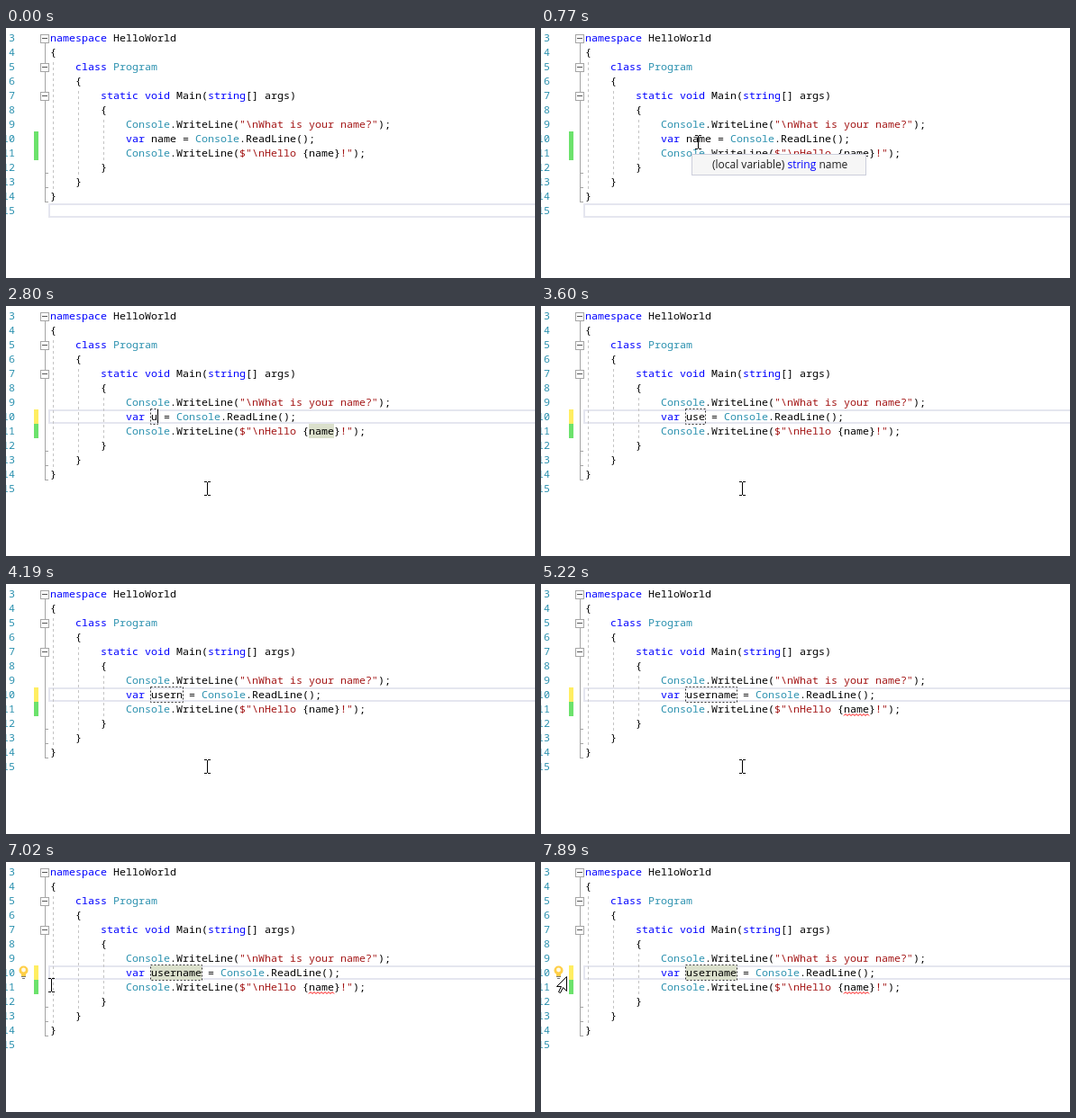
Animation, 587 px wide and 278 px high, one loop 7.99 s. Source, as an HTML page with a canvas:

```html
<!DOCTYPE html>
<html lang="en">
<head>
<meta charset="utf-8">
<title>Renaming a variable</title>
<style>
html, body { margin: 0; width: 100%; height: 100%; overflow: hidden; background: #fff; }
canvas { display: block; }
</style>
</head>
<body>
<canvas id="stage" width="587" height="278"></canvas>
<script>
const ctx = document.getElementById('stage').getContext('2d');
const LOOP = 7990, LEFT = 49, CELL = 7, ROW = 16, FIRST = 3;
const MONO = '11.667px "Noto Sans Mono", "DejaVu Sans Mono", monospace';
const BLUE = '#0000ff', TEAL = '#2b91af', RED = '#a31515', BLACK = '#000';
const MARK = '#dbe0cc', GREY = '#a5a5a5';

// Moments of the story, in ms
const CLICK = 1000, SELECT = 1250, FOUND = 1550, TYPE = 2800, TYPED = 4740;
const ERROR = 5150, HINT = 5770, REFERENCE = 6240;
const BLINK = 526;

const NEW_NAME = 'username';
const source = name => String.raw`namespace HelloWorld
{
    class Program
    {
        static void Main(string[] args)
        {
            Console.WriteLine("\nWhat is your name?");
            var ${name} = Console.ReadLine();
            Console.WriteLine($"\nHello {name}!");
        }
    }
}`.split('\n');

const TOKEN = /(\$?"[^"{]*"?|!"|\b(?:namespace|class|static|void|string|var|Console|Program)\b)/;

// Pointer stops: time, x, y
const stops = [
  [0, 230, 241], [530, 174, 126], [1250, 174, 130], [1550, 198, 165],
  [1780, 223, 203], [5700, 223, 203], [7020, 50, 137],
  [7170, 36, 67], [7330, 29, 144], [7500, 28, 127], [LOOP, 28, 127]
];

const rowTop = line => 3 + (line - FIRST) * ROW;
const colX = col => LEFT + col * CELL;
const within = (t, a, b) => t >= a && t < b;
const smooth = p => p * p * (3 - 2 * p);

function fill(color, x, y, w, h) {
  ctx.fillStyle = color;
  ctx.fillRect(x, y, w, h);
}

function dot(color, x, y, r) {
  ctx.fillStyle = color;
  ctx.beginPath();
  ctx.arc(x, y, r, 0, 2 * Math.PI);
  ctx.fill();
}

function line(color, points, width = 1, dash = []) {
  ctx.strokeStyle = color;
  ctx.lineWidth = width;
  ctx.setLineDash(dash);
  ctx.beginPath();
  points.forEach(([x, y]) => ctx.lineTo(x, y));
  ctx.stroke();
}

function frame(color, x, y, w, h, width = 1, dash = []) {
  ctx.strokeStyle = color;
  ctx.lineWidth = width;
  ctx.setLineDash(dash);
  ctx.strokeRect(x, y, w, h);
}

function tokenColor(token) {
  if (token.includes('"')) return RED;
  return /^[A-Z]/.test(token) ? TEAL : BLUE;
}

function code(name) {
  ctx.font = MONO;
  source(name).forEach((text, row) => {
    let col = 0;
    text.split(TOKEN).forEach((part, i) => {
      ctx.fillStyle = i % 2 ? tokenColor(part) : BLACK;
      ctx.fillText(part, colX(col), rowTop(FIRST + row) + 12);
      col += part.length;
    });
  });
}

function gutter(edited) {
  ctx.font = MONO;
  ctx.fillStyle = TEAL;
  ctx.textAlign = 'right';
  for (let n = FIRST; n <= 15; n++) ctx.fillText(n, 10, rowTop(n) + 12);
  ctx.textAlign = 'left';
  fill('#6ce26c', 31, rowTop(10), 5, 2 * ROW);
  if (edited) fill('#ffee62', 31, rowTop(10), 5, ROW);
}

// One fold box, closing tick and indent guide per nested block
function outline() {
  line(GREY, [[43.5, 12], [43.5, 194]]);
  for (let depth = 0; depth < 3; depth++) {
    const open = FIRST + 2 * depth, close = 14 - depth;
    const y = rowTop(open) + 4.5, x = LEFT + 3.5 + depth * 4 * CELL;
    fill('#fff', 38, y, 10, 9);
    frame(GREY, 38.5, y, 9, 9);
    line('#555', [[40, y + 4], [46, y + 4]]);
    line(GREY, [[43, rowTop(close) + 14.5], [47, rowTop(close) + 14.5]]);
    line('#c4c4c4', [[x, rowTop(open + 2) + 3], [x, rowTop(close)]], 1, [3, 3]);
  }
}

function bulb() {
  dot('#ffcf48', 19.5, 120.5, 5);
  fill('#ffcf48', 17, 124, 5, 3);
  dot('#fffae8', 19.5, 120, 2.4);
  fill('#777', 17, 127, 5, 1);
  fill('#777', 18, 129, 3, 1);
}

function screwdriver() {
  line('#565656', [[14, 129], [19, 124]], 3.5);
  line('#8a8a8a', [[19, 124], [25, 118]], 1.5);
}

function quickInfo() {
  fill('#f6f6f6', 167, 140, 194, 24);
  frame('#cccedb', 167.5, 140.5, 193, 23);
  ctx.font = '12px "Open Sans", sans-serif';
  let x = 190;
  ['(local variable) ', 'string ', 'name'].forEach((word, i) => {
    ctx.fillStyle = i === 1 ? BLUE : '#1e1e1e';
    ctx.fillText(word, x, 156);
    x += ctx.measureText(word).width;
  });
}

function squiggle(x, y, width) {
  const wave = [];
  for (let d = 0; d <= width; d += 2) wave.push([x + d, y - d % 4]);
  line('#f00', wave);
}

function pointer(t) {
  const i = stops.findIndex(([time]) => time > t);
  const [t0, x0, y0] = stops[i - 1], [t1, x1, y1] = stops[i];
  const p = smooth((t - t0) / (t1 - t0));
  const x = Math.round(x0 + (x1 - x0) * p);
  const y = Math.round(y0 + (y1 - y0) * p);
  if (x < 47) arrow(x, y); else beam(x, y);
}

function beam(x, y) {
  fill(BLACK, x, y - 7, 1, 14);
  for (const edge of [-8, 7]) {
    fill(BLACK, x - 3, y + edge, 3, 1);
    fill(BLACK, x + 1, y + edge, 3, 1);
  }
}

function arrow(x, y) {
  ctx.save();
  ctx.translate(x + 0.5, y + 0.5);
  const shape = new Path2D('M0 0V16L-4 12L-7 18L-9 17L-6 11H-11Z');
  ctx.fillStyle = '#fff';
  ctx.fill(shape);
  ctx.strokeStyle = BLACK;
  ctx.lineWidth = 1;
  ctx.setLineDash([]);
  ctx.stroke(shape);
  ctx.restore();
}

// Typing starts hesitantly and speeds up
function letterCount(t) {
  const gaps = NEW_NAME.length - 1;
  const p = Math.min(1, (t - TYPE) / (TYPED - TYPE));
  return p < 0 ? 0 : 1 + Math.floor(gaps * (1 - (1 - p) ** (1 / 1.45)) + 1e-6);
}

function caret(t, nameEnd) {
  const typing = within(t, TYPE, ERROR);
  const steady = letterCount(t) === 1 || letterCount(t - 70) === letterCount(t);
  const lit = Math.floor((t + BLINK * 2 - 1024) / BLINK) % 2 === 0;
  const idle = within(t, 70, TYPE) || t >= REFERENCE;
  if (!(typing && steady) && !(idle && lit)) return;
  const x = t < CLICK ? LEFT : t < SELECT ? 175 : nameEnd;
  fill(BLACK, x, rowTop(t < CLICK ? 15 : 10), 1, 15);
}

function draw(t) {
  const letters = letterCount(t);
  const name = letters ? NEW_NAME.slice(0, letters) : 'name';
  const nameX = colX(16), nameY = rowTop(10), useX = colX(41);
  const nameWidth = name.length * CELL, useWidth = 4 * CELL;
  const selected = within(t, SELECT, TYPE);

  fill('#fff', 0, 0, 587, 278);
  if (selected) fill(t < FOUND ? '#99c9ef' : '#83b6d0', nameX, nameY, nameWidth, ROW);
  else frame('#e5e6ef', 48, rowTop(t < CLICK ? 15 : 10) + 1, 600, 14, 2);
  if (within(t, FOUND, TYPE + 80)) fill(MARK, useX, rowTop(11), useWidth, ROW);
  if (t >= REFERENCE) fill(MARK, nameX, nameY, nameWidth, ROW);

  outline();
  gutter(letters > 0);
  code(name);
  if (letters) frame('#333', nameX - 0.5, nameY - 0.5, nameWidth + 1, 17, 1, [2, 2]);
  if (t >= ERROR) squiggle(useX, 146.5, useWidth);
  caret(t, nameX + nameWidth);

  if (within(t, 1780, TYPE)) screwdriver();
  if (t >= HINT) bulb();
  if (within(t, 770, CLICK)) quickInfo();
  if (t >= 70) pointer(t);
}

function tick() {
  draw(performance.now() % LOOP);
  requestAnimationFrame(tick);
}
tick();
</script>
</body>
</html>
```
